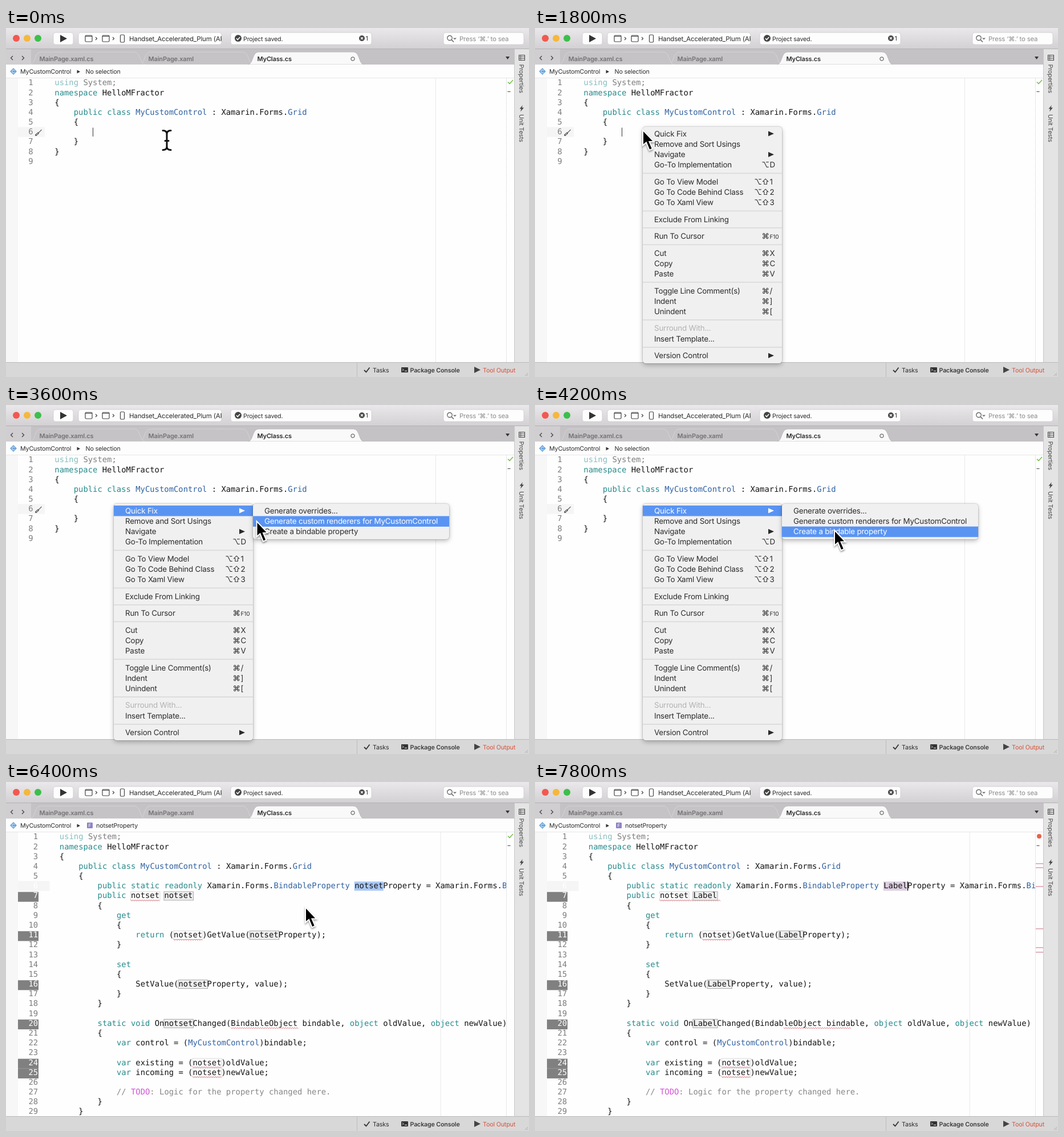
These frames come from a looping animation (917 by 611 pixels, 8 s). An HTML page:

```html
<!DOCTYPE html>
<html lang="en">
<head>
<meta charset="utf-8">
<title>Create a bindable property</title>
<style>
  html, body { margin: 0; width: 100%; height: 100%; overflow: hidden; background: #fefefe; }
  svg { display: block; width: 100vw; height: 100vh; }
  text { white-space: pre; text-rendering: geometricPrecision; font: 10.7px Inter, "DejaVu Sans", sans-serif; letter-spacing: -.015em; fill: #2b2b2b; }
  .bold { font-weight: 600; }
  .code text { font: 13.86px "DejaVu Sans Mono", monospace; letter-spacing: 0; fill: #141414; }
  .code .number { fill: #7d7d7d; text-anchor: end; }
  .code .marked { fill: #fff; }
  .code .comment { fill: #868686; }
  .code .keyword { fill: #278a8c; }
  .code .type { fill: #3162a2; }
  .code .todo { fill: #d352d6; }
  .squiggle { fill: none; stroke: #e0707a; stroke-width: 1; }
  .menu text { font-size: 13.38px; }
  .menu .mod { text-anchor: middle; }
  .menu .off { fill: #b2b2b2; }
  .menu .hot text { fill: #fff; }
  .menu .hot path { fill: #fff; }
  .panel { filter: drop-shadow(0 3px 4px #0003) drop-shadow(0 0 1px #0005); }
</style>
</head>
<body>
<svg id="stage" viewBox="0 0 917 611" preserveAspectRatio="none">
  <defs>
    <linearGradient id="bar" x2="0" y2="1"><stop stop-color="#eae8ea"/><stop offset="1" stop-color="#d2d0d2"/></linearGradient>
    <clipPath id="editor"><path d="M0 88H877V585H0Z"/></clipPath>
    <clipPath id="target"><path d="M127 8H378V29H127Z"/></clipPath>
    <path id="beam" d="M-7-17Q0-17 0-11V11Q0 17-7 17M7-17Q0-17 0-11M0 11Q0 17 7 17M-3 1H3"/>
  </defs>
  <g id="chrome"></g>
  <g id="crumb"></g>
  <g id="code" class="code" clip-path="url(#editor)"></g>
  <path id="caret" d="M152.500 174.500V190" stroke="#333"/>
  <g id="marks"></g>
  <g id="menu" class="menu"></g>
  <g id="ibeam" fill="none" stroke-linecap="round">
    <use href="#beam" stroke="#fff" stroke-width="5"/>
    <use href="#beam" stroke="#111" stroke-width="3"/>
  </g>
  <g id="arrow" style="filter:drop-shadow(0 2px 1.500px #0006)">
    <path d="M0 0V27L6 22L11.500 35.500L17 33L11.500 20.500H19.500Z" fill="#000" stroke="#fff" stroke-width="2"/>
  </g>
</svg>
<script>
const $ = id => document.getElementById(id);
const text = (x, y, content, attrs = '') => `<text x="${x}" y="${y}" ${attrs}>${content}</text>`;
const rect = (x, y, w, h, fill, attrs = '') => `<rect x="${x}" y="${y}" width="${w}" height="${h}" fill="${fill}" ${attrs}/>`;
const path = (d, fill, attrs = '') => `<path d="${d}" fill="${fill}" ${attrs}/>`;
const line = (d, stroke, width = 1, attrs = '') => path(d, 'none', `stroke="${stroke}" stroke-width="${width}" ${attrs}`);
const dot = (x, y, r, fill, attrs = '') => `<circle cx="${x}" cy="${y}" r="${r}" fill="${fill}" ${attrs}/>`;
const field = (x, w) => rect(x, 8, w, 21, '#fdfdfd', 'rx="4" stroke="#c4c2c4" stroke-width=".6"');
const tab = (x, end, fill, edge) => path(`M${x} 64C${x + 10} 64 ${x + 7} 42 ${x + 19} 42H${end - 19}C${end - 7} 42 ${end - 10} 64 ${end} 64Z`, fill, `stroke="${edge}" stroke-width=".8"`);
const sideText = (y, content) => `<g transform="translate(900 ${y}) rotate(90)">${text(0, 0, content, 'fill-opacity=".85"')}</g>`;

function drawChrome() {
  const toolbar = rect(0, 0, 917, 37, 'url(#bar)')
    + dot(18, 18, 6, '#f25850') + dot(37, 18, 6, '#f6b73c') + dot(56, 18, 6, '#3cbf4b')
    + field(83, 35) + path('M95 12L107 18.500L95 25Z', '#333')
    + field(127, 251) + field(394, 247) + field(767, 141)
    + [139, 169].map(x => rect(x, 13, 12, 11, 'none', 'rx="1.500" stroke="#444" stroke-width="1.200"') + line(`M${x} 14.500h12`, '#444')
        + line(`M${x + 18} 16l2.500 2.500l-2.500 2.500`, '#444', 1.2)).join('')
    + rect(200.5, 12, 7, 13, 'none', 'rx="1.500" stroke="#444" stroke-width="1.200"')
    + `<g clip-path="url(#target)">${text(216, 22.5, 'Handset_Accelerated_Plum (API 26)', 'style="font-size:11.5px"')}</g>`
    + dot(407, 18, 6, '#444') + line('M404 18l2.200 2.500l4-4.500', '#fff', 1.5)
    + text(416, 22.5, 'Project saved.')
    + dot(624, 18, 5, '#444') + line('M622 16l4 4m0-4l-4 4', '#fff', 1.2) + text(630.5, 22, '1')
    + dot(778, 17.5, 4.2, 'none', 'stroke="#555" stroke-width="1.200"') + line('M781 20.500l4 4M785 17.500l2 2l2-2', '#555', 1.2)
    + text(795, 22.5, 'Press ‘⌘.’ to sea', 'style="font-size:11.4px;fill:#8d8d8d"');

  const tabs = rect(0, 37, 891, 27, '#c5c2c5') + line('M0 36.500H917', '#b4b2b4')
    + rect(0, 37, 44, 27, '#d0ced0')
    + tab(234, 434, '#c5c3c5', '#d9d7d9') + tab(42, 244, '#c5c3c5', '#d9d7d9') + tab(424, 628, '#f9f9f9', '#b5b3b5')
    + line('M12 49l-3.500 3.500l3.500 3.500M28 49l3.500 3.500l-3.500 3.500', '#444', 1.3)
    + text(58.5, 57.5, 'MainPage.xaml.cs', 'class="bold" style="font-size:11px;fill:#747274"')
    + text(249.5, 57.5, 'MainPage.xaml', 'class="bold" style="font-size:11px;fill:#747274"')
    + text(440.5, 57.5, 'MyClass.cs', 'class="bold" style="font-size:11px"')
    + dot(608, 54, 3.2, 'none', 'stroke="#444"') + path('M876 50h7l-3.500 5Z', '#333');

  const editor = rect(0, 64, 891, 24, '#fdfdfd') + line('M0 87.500H891', '#e6e6e6')
    + rect(0, 88, 891, 497, '#fefefe') + rect(0, 88, 21, 497, '#f7f7f7')
    + line('M877.500 88V585', '#cfcfcf', 1, 'stroke-dasharray="1 1"');

  const side = rect(891, 37, 26, 548, '#e5e4e5') + line('M891.500 37V585', '#c9c8c9')
    + rect(899.5, 47.5, 10, 9, 'none', 'stroke="#444"') + line('M902.500 47v10M899 50.500h11M899 53.500h11', '#444', .8)
    + sideText(63.5, 'Properties') + path('M906 135l-5.500 6.500h3l-1.500 5l6-7h-3.500Z', '#444') + sideText(151, 'Unit Tests');

  const status = rect(0, 585, 917, 26, '#d9d8d9') + line('M0 585.500H917', '#bcbabc') + line('M615.500 586V611', '#bebcbe')
    + line('M628 599l3.500 3.500l6-8', '#333', 1.8) + text(643, 602.5, 'Tasks')
    + rect(693, 594, 12, 9, '#333', 'rx="1"') + line('M695 596.500l2 2l-2 2M699 600.500h4', '#fff')
    + text(708.5, 602.5, 'Package Console', 'class="bold" style="fill:#3c3c3c"')
    + path('M821 593L832 598.500L821 604Z', '#444') + text(836, 602.5, 'Tool Output', 'style="fill:#d5533a"')
    + line('M910 609l5-5M913 609l2-2', '#aaa');
  $('chrome').innerHTML = toolbar + tabs + editor + side + status;
}

function drawCrumb(inserted) {
  $('crumb').innerHTML = path('M13 70L19 76L13 82L7 76Z', '#6ba5dc') + text(10, 79, 'C', 'style="font-size:8px;fill:#fff"')
    + text(25, 80, 'MyCustomControl') + path('M124.500 73.500L130 76.500L124.500 79.500Z', '#333')
    + (inserted
      ? rect(142, 71, 10, 10, '#9182c4', 'rx="1"') + text(144.5, 79, 'F', 'style="font-size:8px;fill:#fff"') + text(158, 80, 'notsetProperty')
      : text(139.5, 80, 'No selection'));
}

const head = ['using System;', 'namespace HelloMFractor', '{', '    public class MyCustomControl : Xamarin.Forms.Grid', '    {'];
// "@" stands for the property name, "#" for its unresolved type.
const property = `public static readonly Xamarin.Forms.BindableProperty @Property = Xamarin.Forms.BindableProperty.Create(
public # @
{
    get
    {
        return (#)GetValue(@Property);
    }

    set
    {
        SetValue(@Property, value);
    }
}

static void On@Changed(BindableObject bindable, object oldValue, object newValue)
{
    var control = (MyCustomControl)bindable;

    var existing = (#)oldValue;
    var incoming = (#)newValue;

    // TODO: Logic for the property changed here.
}`.split('\n').map(row => '        ' + row);
const plainLines = [...head, '', '    }', '}', ''];
const propertyLines = [...head, ...property, '    }'];
const advance = 8.345, pitch = 17.18, base = 100.4;

const highlight = row => row.includes('//')
  ? row.replace('TODO', '<tspan class="todo">TODO</tspan>')
  : row.replace(/\b(using|namespace|public|class|static|readonly|get|set|return|void|object|var)\b|\b(MyCustomControl|BindableProperty|Grid)\b/g,
      (word, keyword) => `<tspan class="${keyword ? 'keyword' : 'type'}">${word}</tspan>`);

function squiggle(x, y, width) {
  let d = `M${x} ${y}`;
  for (let i = 0; i < width / 2; i++) d += `l2 ${i % 2 ? -2 : 2}`;
  return `<path class="squiggle" d="${d}"/>`;
}

function drawCode(inserted, name, typing, errors) {
  const left = inserted ? 93.8 : 85.3, shift = inserted ? 8.7 : 0;
  let out = rect(21, 173.5, 47 + shift, 17.2, '#f5f5f5') + line(`M${753.5 + shift} 88V585`, '#e9e9e9');
  (inserted ? propertyLines : plainLines).forEach((row, i) => {
    const y = base + i * pitch, marked = inserted && i > 4 && /[@#]/.test(row);
    let under = '', full = '';
    for (const char of row) {
      const x = left + full.length * advance;
      if (char === '@') {
        const width = name.length * advance;
        under += i === 5 ? rect(x - .5, y - 12, width + 1, 16, typing ? '#dccfe0' : '#a9c8f5')
          : rect(x - .5, y - 11.5, width + 1.5, 15, '#efefef', 'stroke="#a0a0a0" stroke-width=".9"');
        if (typing && i === 5) under += line(`M${x + width + .7} ${y - 12}v16`, '#000', 1.2);
        full += name;
      } else if (char === '#') {
        under += rect(x - .5, y - 11.5, 51.5, 15, '#fdfdfd', 'stroke="#d2d0d0" stroke-width=".8"')
          + squiggle(x, y + 3, typing && i === 6 ? 106 : 50);
        full += 'notset';
      } else full += char;
    }
    const unresolved = full.indexOf('BindableObject');
    if (unresolved > 0) under += squiggle(left + (unresolved + (errors ? 6 : 0)) * advance, y + 3, 117);
    if (marked && i > 5) out += rect(21, y - 11, 36, 17.2, '#808080');
    out += text(47.5 + shift, y, i + 1, `class="number ${marked ? 'marked' : ''}"`) + under
      + text(left, y, highlight(full), (i ? '' : 'opacity=".55"') + (row.includes('//') ? ' class="comment"' : ''));
  });
  if (!inserted) out += line('M52.500 187.500l4-3.500', '#555', 3, 'stroke-linecap="round"') + line('M53 187l3-2.500', '#fff') + line('M56.500 184l6-6', '#666', 1.3);
  $('code').innerHTML = out;
}

function drawMarks(errors) {
  $('marks').innerHTML = line('M879.500 111.500h5', '#444')
    + (errors
      ? dot(884, 95, 4, '#e8604c') + [143, 150, 183, 257, 290, 298].map(y => line(`M878 ${y}h13`, '#dc9aa8', 1.5)).join('')
      : line('M880 94.500l3 3l6-6.500', '#7cc055', 1.6));
}

// Each item: label, then modifiers and key, or ">" for a submenu.
const groups = [
  ['Quick Fix|>', 'Remove and Sort Usings', 'Navigate|>', 'Go-To Implementation|⌥|D'],
  ['Go To View Model|⌥⇧|1', 'Go To Code Behind Class|⌥⇧|2', 'Go To Xaml View|⌥⇧|3'],
  ['Exclude From Linking'],
  ['Run To Cursor|⌘|F10'],
  ['Cut|⌘|X', 'Copy|⌘|C', 'Paste|⌘|V'],
  ['Toggle Line Comment(s)|⌘|/', 'Indent|⌘|]', 'Unindent|⌘|['],
  ['Surround With...', 'Insert Template...'],
  ['Version Control|>'],
];
const fixes = ['Generate overrides...', 'Generate custom renderers for MyCustomControl', 'Create a bindable property'];
const rowHeight = 18.2, drop = 4.6, blue = '#5994f3';

function menuItem(item, y, hot) {
  const [label, mods, key] = item.split('|');
  let out = text(209, y + drop, label, label.startsWith('Surround') ? 'class="off"' : '');
  if (mods === '>') out += path(`M409 ${y - 4.5}L419 ${y}L409 ${y + 4.5}Z`, '#2b2b2b');
  else if (key) {
    out += [...mods].reverse().map((mod, i) => text(404 - 13 * i, y + drop, mod, 'class="mod"')).join('')
      + text(411.5, y + drop, key, key.length > 1 ? 'style="font-size:10px"' : '');
  }
  return hot ? `<g class="hot">${rect(189, y - 9, 244, 18.5, blue)}${out}</g>` : out;
}

function drawMenu(hot, submenu, fixRow) {
  let y = 185, out = rect(189, 173, 244, 414, '#f1f0f1', 'rx="5" class="panel"');
  groups.forEach((group, g) => {
    if (g) {
      out += line(`M189 ${y - 3.4}H433`, '#dcdbdc', 1.8);
      y += 11.3;
    }
    group.forEach((item, i) => {
      out += menuItem(item, y, hot && !g && !i);
      y += rowHeight;
    });
  });
  if (submenu) {
    out += rect(433, 173, 344, 62, '#f1f0f1', 'rx="5" class="panel"');
    fixes.forEach((label, i) => {
      const cy = 185 + i * rowHeight, item = text(453, cy + drop, label);
      out += i === fixRow ? `<g class="hot">${rect(433, cy - 8.7, 344, 18.5, blue)}${item}</g>` : item;
    });
  }
  $('menu').innerHTML = out;
}

const stops = [[400, 282, 196.4], [1200, 189, 178.5], [2000, 189, 178.5], [2800, 354, 188], [3200, 354, 188], [4000, 525, 219]];
function pointerAt(t) {
  const next = stops.findIndex(stop => stop[0] > t);
  if (next === 0) return stops[0].slice(1);
  if (next < 0) return stops.at(-1).slice(1);
  const [t0, x0, y0] = stops[next - 1], [t1, x1, y1] = stops[next];
  const u = (t - t0) / (t1 - t0), k = u * u * (3 - 2 * u);
  return [x0 + (x1 - x0) * k, y0 + (y1 - y0) * k];
}

const show = (id, on) => $(id).style.display = on ? '' : 'none';

function render(t) {
  const [x, y] = pointerAt(t);
  const menuOpen = t >= 1400 && t < 5400, inserted = t >= 5600, typing = t >= 7000, errors = t >= 7400;
  const name = typing ? 'Label'.slice(0, 1 + (t - 7000) / 200) : 'notset';

  drawCrumb(inserted);
  drawCode(inserted, name, typing, errors);
  drawMarks(errors);
  show('caret', !inserted && (t < 1400 ? t % 1000 < 600 : t < 2200 || t >= 5000));

  show('menu', menuOpen);
  if (menuOpen) drawMenu(x > 195, t >= 2600, x > 433 ? Math.min(2, Math.floor((y - 176) / rowHeight)) : -1);
  $('menu').setAttribute('opacity', t >= 5200 ? .39 : 1);

  show('ibeam', t < 1400);
  show('arrow', t >= 1400 && !typing);
  for (const id of ['ibeam', 'arrow']) $(id).setAttribute('transform', `translate(${x} ${y})`);
}

const loop = 8000, step = 200, start = performance.now();
let shown = -1;
function tick() {
  const t = Math.floor((performance.now() - start) % loop / step) * step;
  if (t !== shown) render(shown = t);
  requestAnimationFrame(tick);
}
drawChrome();
tick();
</script>
</body>
</html>
```
